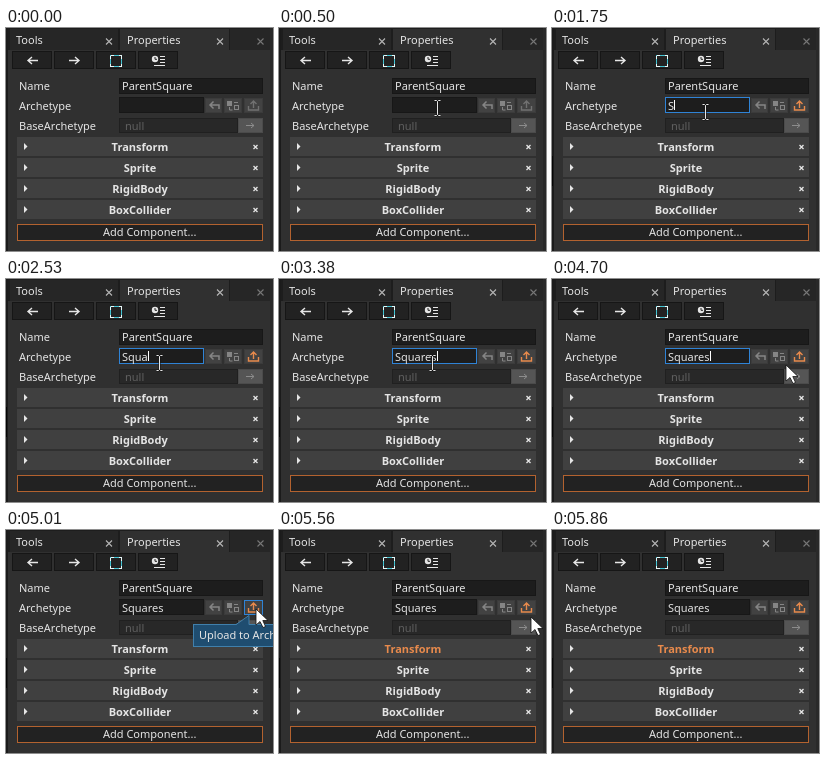
An HTML page that plays this animation: 267 px wide and 223 px high, repeating every 7190 ms.

```html
<!DOCTYPE html>
<html lang="en">
<head>
<meta charset="utf-8">
<title>Properties panel</title>
<style>
html, body { margin: 0; width: 100%; height: 100%; overflow: hidden; background: #303030; }
svg { display: block; width: 267px; height: 223px; }
text { font: 11px "Noto Sans", "Open Sans", sans-serif; fill: #e4e4e4; white-space: pre; }
.bold { font-weight: 700; text-anchor: middle; }
rect { shape-rendering: crispEdges; }
</style>
</head>
<body>
<svg id="stage" viewBox="0 0 267 223"></svg>
<script>
const LOOP = 7190;
const NS = 'http://www.w3.org/2000/svg';
const stage = document.getElementById('stage');
const ORANGE = '#e88a4c', GREY = '#717171', LIGHT = '#e6e6e6';

function add(tag, attrs, parent = stage) {
  const el = document.createElementNS(NS, tag);
  for (const k in attrs) el.setAttribute(k, attrs[k]);
  return parent.appendChild(el);
}
function box(x, y, w, h, fill, edge, parent) {
  const a = { x, y, width: w, height: h, fill };
  if (edge) Object.assign(a, { x: x + .5, y: y + .5, width: w - 1, height: h - 1, stroke: edge });
  return add('rect', a, parent);
}
function label(x, y, str, attrs = {}, parent) {
  const el = add('text', { x, y, ...attrs }, parent);
  el.textContent = str;
  return el;
}
const line = (d, stroke, w = 1, parent) =>
  add('path', { d, stroke, 'stroke-width': w, fill: 'none' }, parent);
const cross = (x, y, r, color, w = 1.1) =>
  line(`M${x - r} ${y - r}l${2 * r} ${2 * r}m0 ${-2 * r}l${-2 * r} ${2 * r}`, color, w);
const show = (el, on) => el.setAttribute('visibility', on ? 'visible' : 'hidden');

// Panel and tabs
box(0, 0, 267, 223, '#303030');
box(0, 0, 267, 22, '#1d1d1d');
box(0, 0, 2, 223, '#1b1b1b');
box(4, 1, 108, 21, '#262626');
box(114, 1, 109, 22, '#303030');
box(224, 1, 43, 21, '#262626');
box(264, 0, 3, 223, '#292929');
label(10, 16, 'Tools');
label(121, 16, 'Properties');
cross(103, 13.5, 3, '#b5b5b5');
cross(214, 13.5, 3, '#b5b5b5');
cross(254.5, 13.5, 3, '#777');
const edge = box(0, 128, 1, 30, '#050505');

// Toolbar
for (let i = 0; i < 4; i++) box(6 + 42 * i, 23, 40, 18, '#222', '#161616');
line('M32 32.5H22m4-3.5l-4 3.5 4 3.5', LIGHT, 1.4);
line('M63 32.5h10m-4-3.5l4 3.5-4 3.5', LIGHT, 1.4);
box(104, 27, 12, 12, 'none', '#43c4d3');
add('rect', { x: 104.5, y: 27.5, width: 11, height: 11, fill: 'none', stroke: '#e8f7f8', 'stroke-dasharray': '3 5 3 0' });
add('circle', { cx: 149, cy: 31, r: 3.2, fill: LIGHT });
line('M149 29v2.3h2', '#222');
line('M154 28.5h5M154 31.5h5M154 34.5h5M148 37.5h11', LIGHT);

// Property rows
['Name', 'Archetype', 'BaseArchetype'].forEach((s, i) => label(13, 62 + 20 * i, s));
box(113, 50, 144, 16, '#1d1d1d', '#171717');
label(116, 62, 'ParentSquare');
const field = box(113, 69, 85, 16, '#1d1d1d', '#171717');
const typed = label(116, 82, '');
const caret = box(116, 72, 1, 10, '#fff');
box(113, 90, 119, 15, '#282828', '#202020');
label(119, 102, 'null', { style: 'fill:#606060' });
box(232, 90, 25, 15, '#555', '#4b4b4b');
line('M240 97.5h8m-3-2.5l3 2.5-3 2.5', '#8c8c8c');

box(199, 70, 17, 15, '#424242', '#3b3b3b');
line('M213 81v-4h-9m3.5-3.5l-3.5 3.5 3.5 3.5', '#858585', 1.5);
box(218, 70, 18, 15, '#424242', '#3b3b3b');
box(221, 73, 5, 5, '#858585');
box(228, 77, 5, 5, 'none', '#858585');
line('M228 74.5h4M223.500 79v3h3', '#858585');
const upload = box(238, 70, 19, 15, '#424242', '#3b3b3b');
const uploadIcon = line('M242.500 78v4h10v-4M247.500 80v-7m-3 3l3-3 3 3', GREY, 1.4);

// Component list
const heads = ['Transform', 'Sprite', 'RigidBody', 'BoxCollider'].map((s, i) => {
  const y = 109 + 21 * i;
  box(11, y, 246, 19, '#404040');
  add('path', { d: `M18 ${y + 6}l3.500 3.500-3.500 3.500z`, fill: LIGHT });
  cross(249.5, y + 10, 2, LIGHT, 1.3);
  return label(134, y + 14, s, { class: 'bold' });
});
box(11, 196, 246, 17, '#222', '#b3622f');
label(97, 208, 'Add Component...');

// Tooltip
const tip = add('g', {});
box(187, 94, 90, 23, '#1f4d70', '#4080ac', tip);
add('path', { d: 'M230 95l13-9v9z', fill: '#1f4d70' }, tip);
line('M230 94.500l13-9v9', '#4080ac', 1, tip);
label(193, 109, 'Upload to Archetype', {}, tip);

// Pointers
const arrow = add('path', {
  d: 'M0 0V16L4 12.500 7 18.500 9.500 17.500 6.800 11.500H12Z',
  fill: '#fff', stroke: '#111', 'stroke-width': .8
});
const beam = add('g', {});
const beamPath = 'M-3-7.500h2l1 1 1-1h2M0-6.500v13M-3 7.500h2l1-1 1 1h2';
line(beamPath, '#151515', 2, beam);
line(beamPath, '#e8e8e8', 1, beam);

// time, pointer, x, y
const moves = [
  [0], [120, arrow, 158, 28], [200, arrow, 158, 35], [270, arrow, 158, 44],
  [350, beam, 158.5, 59], [420, beam, 158.5, 72], [500, beam, 158.5, 80],
  [1050, beam, 153.5, 84], [4160, beam, 156.5, 84],
  [4240, arrow, 164, 88], [4310, arrow, 172, 92], [4390, arrow, 181, 95],
  [4470, arrow, 192, 95], [4550, arrow, 206, 93], [4620, arrow, 220, 90],
  [4700, arrow, 234, 86], [4780, arrow, 244, 82], [4860, arrow, 250, 79],
  [5560, arrow, 252, 87], [5630, arrow, 255, 102], [5710, arrow, 259, 120],
  [5790, arrow, 263, 139], [5860]
];
// one keystroke per time, with the caret after it
const keys = [[1750, 122], [2130, 129], [2300, 136], [2530, 142], [2840, 147], [2910, 153], [3380, 158]];
const word = 'Squares';

function draw(t) {
  const [, kind, x, y] = moves.filter(m => m[0] <= t).pop();
  for (const p of [arrow, beam]) show(p, p === kind);
  if (kind) kind.setAttribute('transform', `translate(${x} ${y})`);

  const n = keys.filter(k => k[0] <= t).length;
  const focus = t >= 650 && t < 5010;
  typed.textContent = word.slice(0, n);
  field.setAttribute('stroke', focus ? '#2f83d6' : '#171717');
  caret.setAttribute('x', n ? keys[n - 1][1] : 116);
  show(caret, focus && t >= 750);
  show(edge, t >= 650);

  uploadIcon.setAttribute('stroke', n ? ORANGE : GREY);
  upload.setAttribute('stroke', t >= 4780 && t < 5560 ? '#2f83d6' : '#3b3b3b');
  show(tip, t >= 4860 && t < 5090);
  heads[0].style.fill = t >= 5090 ? ORANGE : '';
}

const start = performance.now();
function tick() {
  draw((performance.now() - start) % LOOP);
  requestAnimationFrame(tick);
}
tick();
</script>
</body>
</html>
```
